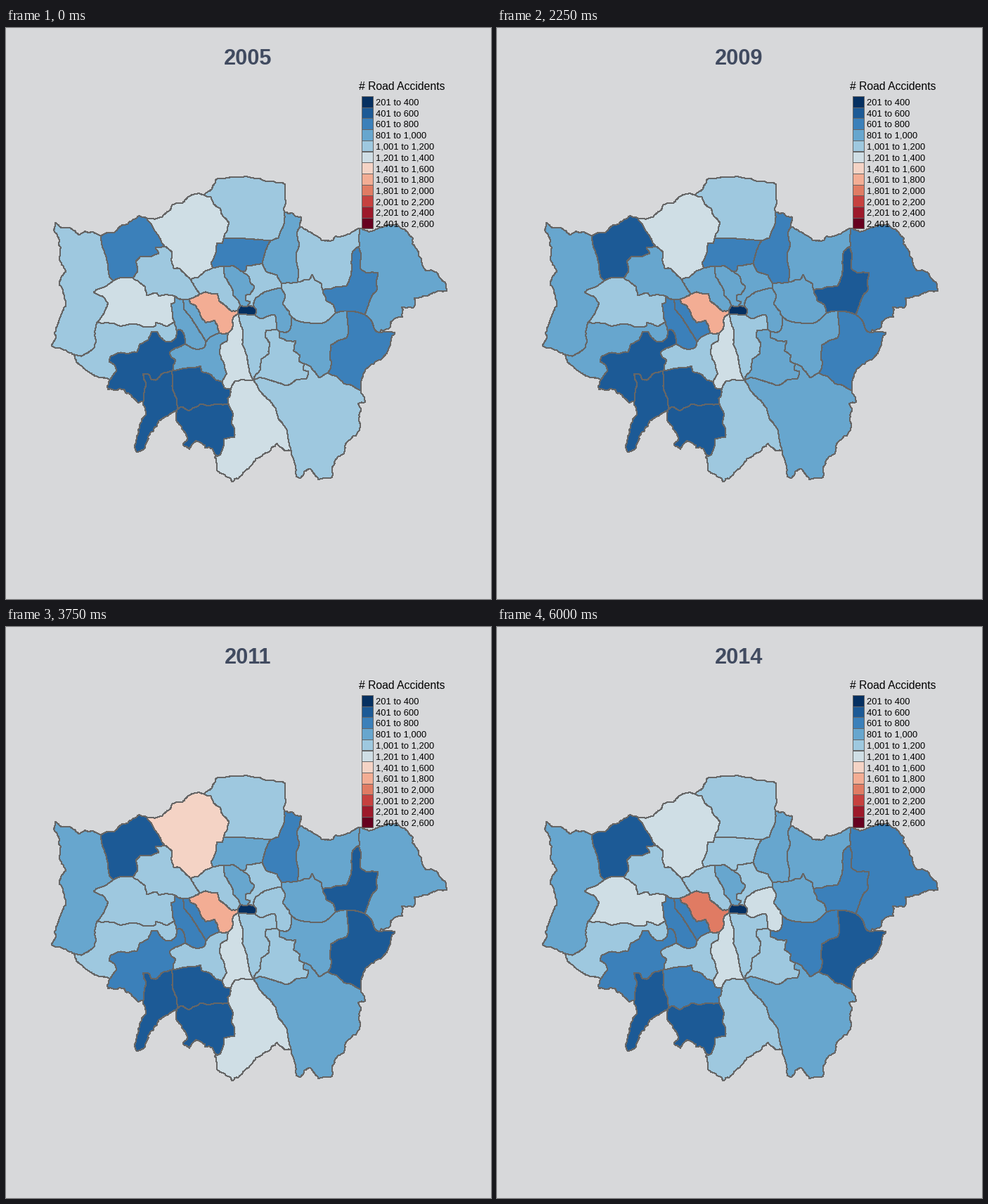
A matplotlib script for the animation above (6.75 s loop, 690 px wide and 812 px high).

```python
import matplotlib.pyplot as plt
import numpy as np
from matplotlib.animation import FuncAnimation
from matplotlib.collections import LineCollection
from matplotlib.patches import Polygon, Rectangle

W, H, DPI = 690, 812, 64
GREY = "#666666"
PALETTE = ["#053061", "#1c5a96", "#3b80ba", "#67a6ce", "#9ec8df", "#cfdee5",
           "#f4d3c5", "#f3ad94", "#e07b63", "#c6413f", "#9d1a2b", "#67001f"]

rng = np.random.default_rng(7)
arcs = []
years = []


def px(n):
    return n * 72 / DPI


def weave(a, b):
    out = np.empty((len(a) + len(b), 2))
    out[0::2], out[1::2] = a, b
    return out


def roughen(p, amount):
    """Midpoint displacement, for a ragged boundary."""
    for _ in range(3):
        d = np.diff(p, axis=0)
        size = np.maximum(np.hypot(d[:, 0], d[:, 1])[:, None], 1e-6)
        normal = np.column_stack([-d[:, 1], d[:, 0]]) / size
        shift = rng.normal(0, amount, (len(d), 1)) * np.minimum(size, 10)
        p = weave(p, (p[:-1] + p[1:]) / 2 + normal * shift)
    return p


def smooth(p):
    """Corner cutting that keeps both ends."""
    for _ in range(3):
        a, b = p[:-1], p[1:]
        p = np.vstack([p[:1], weave(.75 * a + .25 * b, .25 * a + .75 * b), p[-1:]])
    return p


def border(names, *xy, river=False):
    """Line between two districts, or between one district and the outside."""
    names = names.split()
    p = np.array(xy, float).reshape(-1, 2)
    p = smooth(p) if river else roughen(p, .05 if len(names) == 2 else .11)
    arcs.append((names, p))


def outline(name):
    """Join all borders of a district into one ring."""
    parts = [p for names, p in arcs if name in names]
    ring = parts.pop(0)
    while parts:
        for i, p in enumerate(parts):
            if np.array_equal(p[-1], ring[-1]):
                p = p[::-1]
            if np.array_equal(p[0], ring[-1]):
                ring = np.vstack([ring, p[1:]])
                del parts[i]
                break
        else:
            break
    return ring


def year(number, **changes):
    """Classes of one year; districts not named keep their last class."""
    last = years[-1][1] if years else {}
    years.append((number, {**last, **changes}))


# Outer boundary, clockwise from the west
border("hil", 97, 464, 85, 458, 64, 451, 71, 440, 70, 431, 77, 410, 85, 395,
       83, 380, 75, 365, 79, 352, 85, 346, 76, 330, 76, 301, 69, 290, 70, 276,
       76, 282, 86, 283, 103, 294, 113, 289, 134, 295)
border("har", 134, 295, 150, 291, 163, 281, 178, 274, 190, 267, 200, 270)
border("bar", 200, 270, 210, 271, 222, 268, 232, 259, 236, 251, 251, 248,
       258, 240, 270, 236, 281, 237)
border("enf", 281, 237, 292, 229, 297, 216, 312, 213, 333, 211, 365, 216,
       397, 222, 396, 262)
border("wal", 396, 262, 406, 262, 411, 267, 420, 268, 418, 282)
border("red", 418, 282, 428, 287, 437, 293, 450, 302, 460, 303, 468, 296,
       480, 295, 490, 291, 503, 284)
border("hav", 503, 284, 516, 290, 528, 285, 540, 281, 556, 278, 567, 286,
       578, 298, 578, 307, 586, 322, 597, 345, 612, 347, 627, 373, 611, 375,
       597, 381, 580, 384, 579, 397, 562, 397, 564, 410, 552, 413, 546, 425,
       531, 433)
border("bex", 531, 433, 553, 433, 547, 442, 544, 455, 540, 463, 527, 473,
       517, 480, 507, 492, 504, 515)
border("bro", 504, 515, 511, 531, 500, 534, 503, 546, 502, 572, 485, 588,
       480, 605, 470, 612, 463, 625, 464, 638, 444, 642, 432, 626, 424, 630,
       418, 640, 413, 638, 405, 600)
border("cro", 405, 600, 396, 601, 385, 590, 372, 603, 355, 612, 345, 626,
       330, 640, 322, 645, 312, 637, 300, 629, 299, 615, 296, 610, 304, 607)
border("sut", 304, 607, 297, 606, 293, 598, 283, 597, 270, 586, 261, 599,
       251, 592, 258, 585, 250, 570, 241, 556, 243, 542)
border("kin", 243, 542, 232, 549, 217, 558, 210, 572, 203, 579, 197, 597,
       185, 602, 184, 590, 188, 575, 191, 561, 199, 548, 195, 530)
border("ric", 195, 530, 187, 532, 177, 521, 163, 513, 154, 515, 144, 513,
       145, 505, 147, 500)
border("hou", 147, 500, 135, 497, 122, 492, 113, 486, 100, 475, 97, 464)

# West
border("hil har", 134, 295, 137, 312, 143, 330, 147, 354, 152, 359)
border("hil eal", 152, 359, 143, 366, 133, 370, 124, 375, 140, 384, 145, 391,
       139, 405, 129, 418)
border("hil hou", 129, 418, 126, 430, 128, 445, 125, 454, 112, 463, 106, 466,
       97, 464)
border("har bar", 200, 270, 213, 290, 225, 310)
border("har bre", 225, 310, 212, 312, 217, 320, 207, 324, 190, 325, 184, 332,
       187, 345, 180, 355)
border("har eal", 180, 355, 167, 354, 152, 359)
border("eal bre", 180, 355, 190, 362, 197, 367, 200, 380, 214, 376, 217, 381,
       230, 379, 240, 381)
border("eal ham", 240, 381, 239, 390, 234, 392, 236, 407, 239, 417)
border("eal hou", 129, 418, 150, 419, 165, 423, 180, 420, 197, 425, 212, 424,
       213, 418, 229, 424, 239, 417)
border("bre bar", 225, 310, 236, 318, 235, 328, 238, 341, 247, 342, 262, 357)
border("bre cam", 262, 357, 269, 369, 275, 378)
border("bre wes", 275, 378, 268, 382, 260, 385)
border("bre ken", 260, 385, 251, 386)
border("bre ham", 240, 381, 246, 385, 251, 386)
border("hou ham", 239, 417, 241, 424, 242, 431)
border("hou ric", 242, 431, 241, 440, 234, 446, 223, 443, 215, 432, 207, 431,
       202, 443, 190, 449, 186, 460, 172, 463, 160, 461, 148, 467, 146, 474,
       154, 479, 157, 487, 147, 500)

# North
border("bar enf", 281, 237, 291, 240, 295, 250, 305, 257, 308, 267, 317, 277,
       313, 290, 309, 299)
border("bar hgy", 309, 299, 307, 306, 300, 305, 299, 314, 297, 322, 291, 334,
       295, 341)
border("bar cam", 262, 357, 272, 355, 283, 345, 295, 341)
border("enf hgy", 309, 299, 340, 299, 376, 302)
border("enf wal", 376, 302, 387, 298, 395, 278, 396, 262)
border("hgy wal", 376, 302, 369, 315, 364, 334)
border("hgy hac", 364, 334, 342, 338, 340, 345, 336, 346)
border("hgy isl", 336, 346, 330, 342, 322, 337, 309, 339)
border("hgy cam", 309, 339, 302, 339, 295, 341)
border("cam isl", 309, 339, 311, 354, 319, 366, 323, 380, 330, 387, 333, 394)
border("cam wes", 275, 378, 284, 375, 300, 377, 303, 388, 311, 394, 320, 402,
       329, 401)
border("isl hac", 336, 346, 346, 354, 347, 362, 353, 367, 347, 378, 340, 380,
       341, 387, 347, 389, 343, 395)
border("wal hac", 364, 334, 370, 346, 385, 351, 391, 362)
border("wal new", 391, 362, 403, 362, 414, 361)
border("wal red", 418, 282, 413, 292, 417, 308, 412, 325, 416, 345, 414, 361)

# East
border("red new", 414, 361, 431, 357, 435, 350, 439, 358, 448, 363, 450, 372)
border("red bad", 450, 372, 463, 370, 484, 366, 490, 352, 491, 325, 493, 317,
       502, 310)
border("red hav", 503, 284, 501, 297, 502, 310)
border("hav bad", 502, 310, 505, 322, 503, 341, 512, 348, 529, 347, 526, 359,
       528, 370, 518, 385, 510, 407)
border("new bad", 450, 372, 455, 387, 465, 393, 468, 405)
border("hac new", 391, 362, 391, 370)
border("hac tow", 391, 370, 381, 371, 370, 374, 355, 383, 351, 395)
border("tow new", 391, 370, 397, 379, 393, 391, 402, 402, 406, 410)
border("bad gre", 468, 405, 477, 402, 485, 402, river=True)
border("bad bex", 485, 402, 499, 403, 510, 407, river=True)
border("hav bex", 510, 407, 520, 415, 524, 430, 531, 433, river=True)
border("new gre", 406, 410, 414, 417, 440, 420, 454, 419, 468, 405, river=True)
border("tow gre", 406, 410, 405, 427, 399, 433, 389, 431, river=True)
border("tow lew", 389, 431, 387, 430, 385, 428)
border("tow sou", 354, 408, 362, 414, 372, 409, 383, 406, 384, 418, 385, 428,
       river=True)

# Centre
border("cit cam", 329, 401, 333, 394)
border("cit isl", 333, 394, 338, 396, 343, 395)
border("cit hac", 343, 395, 351, 395)
border("cit tow", 351, 395, 356, 401, 354, 408)
border("cit sou", 354, 408, 342, 407, 330, 406, river=True)
border("cit wes", 329, 401, 330, 406)
border("wes ken", 260, 385, 262, 391, 269, 394, 276, 408, 283, 418, 296, 415,
       301, 424, 303, 433)
border("wes wan", 303, 433, 309, 435, 316, 433, river=True)
border("wes lam", 316, 433, 323, 426, 321, 411, 330, 406, river=True)
border("ken ham", 251, 386, 253, 400, 263, 412, 272, 426, 284, 446)
border("ken wan", 284, 446, 289, 439, 303, 433, river=True)
border("ham wan", 284, 446, 282, 455, 268, 457, 255, 449, river=True)
border("ham ric", 255, 449, 253, 433, 246, 427, 242, 431, river=True)

# South
border("wan ric", 255, 449, 240, 455, 232, 461, 235, 468, 241, 472, 238, 478,
       236, 487)
border("wan lam", 316, 433, 314, 444, 305, 450, 303, 461, 310, 478, 313, 492,
       307, 503)
border("wan mer", 236, 487, 250, 484, 270, 482, 276, 480, 278, 488, 290, 492,
       298, 500, 307, 503)
border("ric kin", 236, 487, 222, 491, 214, 500, 206, 499, 203, 492, 194, 492,
       199, 505, 196, 518, 195, 530)
border("mer kin", 236, 487, 237, 500, 236, 512, 242, 526, 243, 542)
border("mer sut", 316, 534, 300, 534, 288, 537, 275, 535, 268, 539, 260, 544,
       250, 538, 243, 542)
border("mer lam", 307, 503, 310, 511, 319, 513)
border("mer cro", 319, 513, 319, 521, 315, 526, 316, 534)
border("sut cro", 316, 534, 322, 545, 320, 560, 325, 570, 325, 581, 310, 584,
       308, 597, 304, 607)
border("lam cro", 319, 513, 325, 502, 336, 499, 351, 500)
border("lam sou", 330, 406, 333, 420, 337, 432, 336, 450, 342, 468, 345, 487,
       351, 500)
border("sou lew", 385, 428, 370, 429, 368, 439, 375, 448, 373, 463, 362, 471,
       362, 485, 355, 492, 351, 500)
border("lew gre", 389, 431, 388, 439, 400, 445, 412, 445, 409, 459, 418, 465,
       416, 473, 424, 477)
border("lew bro", 424, 477, 422, 486, 430, 488, 427, 498, 412, 500, 400, 508,
       384, 503, 366, 497, 351, 500)
border("gre bro", 424, 477, 433, 481, 445, 497, 457, 490)
border("gre bex", 485, 402, 487, 425, 484, 440, 475, 443, 462, 450, 460, 465,
       463, 475, 457, 490)
border("bex bro", 457, 490, 470, 495, 480, 505, 492, 508, 504, 515)
border("cro bro", 351, 500, 358, 511, 366, 522, 376, 531, 383, 540, 387, 555,
       397, 568, 401, 584, 405, 600)

year(2005, hil=4, har=2, bar=5, enf=4, bre=4, eal=5, hou=4, ric=1, kin=1,
     mer=1, sut=1, cro=5, bro=4, bex=2, gre=3, lew=4, sou=4, lam=5, wan=3,
     ham=3, ken=3, wes=7, cam=4, isl=3, hac=4, hgy=2, wal=3, red=4, hav=3,
     bad=2, new=4, tow=3, cit=0)
year(2006, har=1, bre=3, hou=3, bro=3, lew=3, ham=2, hac=3, red=3, bad=1)
year(2007, eal=4, kin=0, cro=4, bex=1, lam=4, ken=2, cam=3, isl=2, red=2)
year(2009, hil=3, kin=1, bex=2, lam=5, wan=4, isl=3, wal=2, red=3, hav=2,
     new=3)
year(2010, hil=4, bar=6, bex=1, wes=6, hgy=3)
year(2011, hil=3, bre=4, hou=4, ric=2, cro=5, lew=4, wes=7, cam=4, hac=4,
     hav=3, tow=4)
year(2012, hil=9, bar=11, enf=9, eal=10, hou=7, ric=3, kin=3, mer=4, sut=3,
     cro=10, bex=4, gre=4, wan=10, ken=3, wes=8, cam=3, hgy=7, bad=2, tow=5,
     cit=1)
year(2013, hil=2, bar=5, enf=4, bre=3, eal=4, hou=3, ric=1, kin=1, mer=1,
     sut=1, cro=4, bro=2, bex=1, gre=2, lew=3, sou=3, wan=4, ken=2, wes=7,
     hac=3, hgy=3, red=2, hav=2, bad=1, tow=4, cit=0)
year(2014, hil=3, bre=4, eal=5, hou=4, ric=2, mer=2, bro=3, lew=4, sou=4,
     wes=8, cam=4, hac=4, hgy=4, wal=3, red=3, bad=2, tow=5)

plt.rcParams["font.family"] = "Liberation Sans"
fig = plt.figure(figsize=(W / DPI, H / DPI), dpi=DPI, facecolor="#d7d8da")
ax = fig.add_axes([0, 0, 1, 1])
ax.set_xlim(-.5, W - .5)
ax.set_ylim(H - .5, -.5)
ax.axis("off")

shapes = {}
for name in years[0][1]:
    shapes[name] = ax.add_patch(Polygon(outline(name), lw=0, antialiased=False))
ax.add_collection(LineCollection([p for _, p in arcs], colors=GREY,
                                 linewidths=px(1), antialiaseds=False, zorder=2))

# Legend
ax.text(502, 87, "# Road Accidents", size=px(15.8), zorder=4)
STEP = 15.7
for i, color in enumerate(PALETTE):
    low = 200 * (i + 1)
    ax.add_patch(Rectangle((505, 96.5 + i * STEP), 16, STEP, fc=color, ec=GREY,
                           lw=px(1), antialiased=False, zorder=3))
    ax.text(525, 109.4 + i * STEP, f"{low + 1:,} to {low + 200:,}",
            size=px(12.9), zorder=4)

title = ax.text(344, 51, "", size=px(30.7), weight="bold", color="#414b60",
                ha="center")


def draw(i):
    number, classes = years[i]
    title.set_text(str(number))
    for name, shape in shapes.items():
        shape.set_facecolor(PALETTE[classes[name]])
    return [title, *shapes.values()]


anim = FuncAnimation(fig, draw, frames=len(years), interval=750, repeat=True,
                     repeat_delay=0, blit=False)
plt.show()
```
